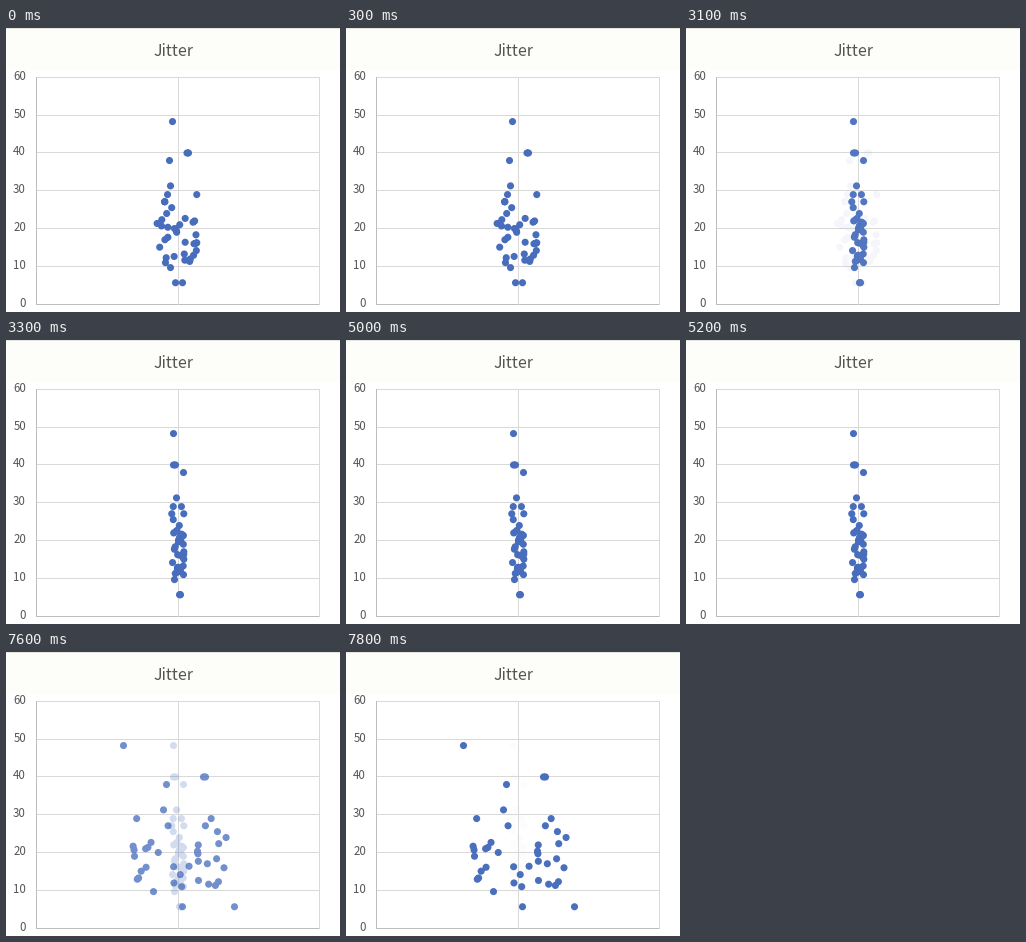
Recreate the animation shown at these times as a matplotlib script. Size 334 by 284 pixels, loop 8000 ms.

```python
import matplotlib.pyplot as plt
import numpy as np
from matplotlib.animation import FuncAnimation
from matplotlib.patches import PathPatch, Rectangle
from matplotlib.path import Path

W, H, DPI = 334, 284, 100
STEP = 100
FRAMES = 80
BLUE, GREY, GRID, AXIS = "#476dbc", "#555555", "#d9d9d9", "#bdbdbd"
FONT = "Noto Sans CJK JP"

# Isolated points: value, then x under medium, narrow and wide jitter
OUTLIERS = np.array([
    (48.3, 166.5, 167.5, 117.5),
    (40, 181, 167.5, 197.5),
    (40, 182.5, 169.5, 199.5),
    (38, 163.5, 177.5, 160.5),
    (31.3, 164.5, 170.5, 157.5),
    (9.7, 164.5, 168.5, 147.5),
    (5.7, 169.5, 173.5, 176.5),
    (5.7, 176.5, 174.5, 228.5),
])

# The cloud between them: values fall with rank, x is uniform jitter
CLOUD = np.interp(np.arange(34),
                  [0, 1, 2, 3, 5, 6, 15, 20, 23, 26, 33],
                  [29, 29, 27.1, 27.1, 24, 22.7, 19.7, 16.4, 16, 13.3, 11])
VALUES = np.append(OUTLIERS[:, 0], CLOUD)
CENTER = 172
SPREADS = (21, 6.5, 52)
FADE_TAU = 70


def y_of(value):
    return 276 - value * 227 / 60


def box(x, y, w, h, color, z=1):
    ax.add_patch(Rectangle((x, y), w, h, fc=color, lw=0, zorder=z,
                           antialiased=False))


def label(x, y, text, px, **kw):
    ax.text(x, y, text, fontsize=px * 72 / DPI, color=GREY, family=FONT,
            va="baseline", **kw)


def dots(known, spread):
    # One compound shape, so overlapping dots fade as a single layer
    jitter = rng.uniform(-spread, spread, len(CLOUD))
    xs = np.append(known, CENTER + jitter)
    rings = [Path.circle((x, y_of(v) + 0.3), 3.55)
             for x, v in zip(xs, VALUES)]
    patch = PathPatch(Path.make_compound_path(*rings), fc=BLUE, lw=0, zorder=5)
    return ax.add_patch(patch)


def fade(t, start):
    """Share of the incoming layer: fast at first, settled after 300 ms."""
    if t <= start:
        return 0
    return 1 if t >= start + 400 else 1 - np.exp((start - t) / FADE_TAU)


fig = plt.figure(figsize=(W / DPI, H / DPI), dpi=DPI, facecolor="white")
ax = fig.add_axes([0, 0, 1, 1])
ax.set_xlim(0, W)
ax.set_ylim(H, 0)
ax.axis("off")

box(0, 0, W, 42, "#fdfdfa", 0)
box(0, 0, W, 1, "#e6e6e0", 0)

for value in range(0, 70, 10):
    y = int(y_of(value) + 0.3)
    box(30, y, 284, 1, GRID if value else AXIS)
    label(20, y + 3.4, str(value), 11.5, ha="right")
for x in (172, 313):
    box(x, 49, 1, 228, GRID)
box(30, 49, 1, 228, AXIS, 2)
label(167.5, 28.3, "Jitter", 16, ha="center")

rng = np.random.default_rng(12)
layers = [dots(known, spread)
          for known, spread in zip(OUTLIERS[:, 1:].T, SPREADS)]


def draw(i):
    t = i * STEP
    narrow, wide = fade(t, 2900), fade(t, 7500)
    for layer, alpha in zip(layers, (1 - narrow, narrow * (1 - wide), wide)):
        layer.set_alpha(alpha)
        layer.set_visible(alpha > 0)
    return layers


anim = FuncAnimation(fig, draw, frames=FRAMES, interval=STEP, repeat=True,
                     repeat_delay=0, blit=False)
plt.show()
```
